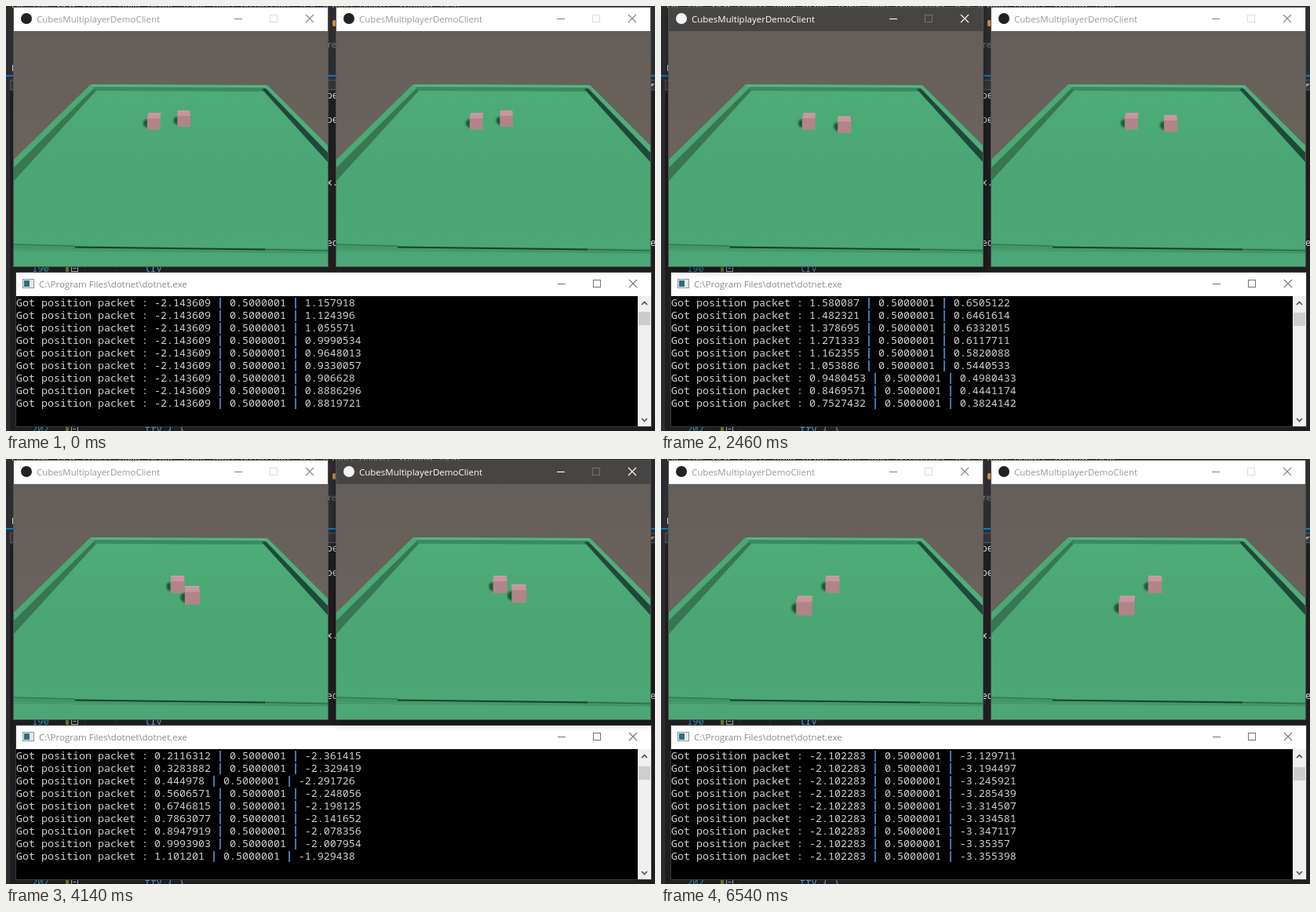
Write an HTML page that moves like this. It is 827 by 542 pixels and loops after 6660 ms.

```html
<!DOCTYPE html>
<html lang="en">
<head>
<meta charset="utf-8">
<title>Cubes multiplayer demo</title>
<style>
html, body { margin: 0; width: 100%; height: 100%; overflow: hidden; background: #1e1e1e; }
svg { display: block; }
text { white-space: pre; }
.ui { font-family: "Open Sans", "Noto Sans", sans-serif; font-size: 11.5px; }
.mono { font-family: "Noto Sans Mono", "DejaVu Sans Mono", monospace; font-size: 13.333px; }
.code { font-family: "Noto Sans Mono", "DejaVu Sans Mono", monospace; font-size: 12px; }
.pipe { fill: #5aa0e0; font-weight: bold; }
</style>
</head>
<body>
<svg id="stage" width="827" height="542" viewBox="0 0 827 542"></svg>
<script>
const LOOP = 6660, STEP = 60, PACKET = 20, ROWS = 9;
const LEFT_ON = 480, SWITCH = 2760, ALL_OFF = 6540;

// ---- motion: a few key points [time, x, z] per cube
const HOME = -2.143609, SIDE = -2.102283;
const cubeB = [
  [700, .28, 1.31], [930, .281, .7],
  [1160, .2971759, -.3498101], [1240, .4192981, -.7630728], [1320, .6473886, -1.177583],
  [1590, 1.83, -1.75], [1930, 2.8, -.5], [2110, 2.4, .22],
  [2300, 1.580087, .6505122], [2460, .7527432, .3824142], [2700, -.2213, -.6604]
];
const cubeA = [
  [-160, HOME, 1.157918], [-100, HOME, .9990534], [0, HOME, .8819721],
  [2860, HOME, .8819721], [3130, HOME, .15],
  [3380, -2.117997, -.9949791], [3460, -2.025084, -1.32549], [3540, -1.815446, -1.658332],
  [3850, -.5, -2.45], [4130, 1.05, -1.97], [4390, 2.2, -.35],
  [4640, 1.187943, 1.33658], [4800, .4374101, 1.866238], [4970, -.4, 2.02],
  [5250, -1.62, 1.4], [5490, SIDE, .25],
  [5600, SIDE, -.2301522], [5760, SIDE, -.9809671], [6260, SIDE, -3.129711], [6420, SIDE, -3.355398]
];

// Tangent at a key; flat at the ends and at turning points
function slope(keys, i, d) {
  const a = keys[i - 1], k = keys[i], b = keys[i + 1];
  if (!a || !b || (b[d] - k[d]) * (k[d] - a[d]) <= 0) return 0;
  return (b[d] - a[d]) / (b[0] - a[0]);
}

function at(keys, t) {
  const last = keys.length - 1;
  if (t <= keys[0][0]) return keys[0].slice(1);
  if (t >= keys[last][0]) return keys[last].slice(1);
  let i = 0;
  while (keys[i + 1][0] <= t) i++;
  const p = keys[i], q = keys[i + 1], h = q[0] - p[0], u = (t - p[0]) / h;
  const w = u * u * (3 - 2 * u);
  return [1, 2].map(d => p[d] + (q[d] - p[d]) * w
    + h * slope(keys, i, d) * u * (1 - u) * (1 - u)
    - h * slope(keys, i + 1, d) * u * u * (1 - u));
}

// ---- packet log, one line per tick while a cube moves
const num = v => String(Number(v.toPrecision(7)));
const log = [];
function record(keys, from, to) {
  for (let t = from; t <= to; t += PACKET) {
    const [x, z] = at(keys, t);
    log.push({ t, x, z });
  }
}
record(cubeA, -160, 0);
record(cubeB, 720, 2700);
record(cubeA, 2880, 6420);

// ---- drawing helpers
const poly = (pts, fill, more = "") => `<polygon points="${pts}" fill="${fill}" ${more}/>`;
const rect = (x, y, w, h, fill, more = "") =>
  `<rect x="${x}" y="${y}" width="${w}" height="${h}" fill="${fill}" ${more}/>`;
const line = (d, stroke, width = 1, more = "") =>
  `<path d="${d}" fill="none" stroke="${stroke}" stroke-width="${width}" ${more}/>`;
const text = (x, y, s, fill, cls, more = "") =>
  `<text x="${x}" y="${y}" fill="${fill}" class="${cls}" ${more}>${s}</text>`;

function codeLine(n, y, s) {
  return text(33, y, n, "#2b91af", "code") + text(177, y, s, "#569cd6", "code")
    + rect(76, y - 10, 4, 17, "#577430")
    + rect(83.5, y - 8, 8, 8, "#1e1e1e", 'stroke="#a5a5a5"')
    + line(`M85.5 ${y - 4}h4`, "#a5a5a5");
}

function editor() {
  const menu = "File   Edit   View   Project   Build   Debug   Team   Tools   Architecture   "
    + "Test   R Tools   Analyze   Window   Help";
  const gap = [[118, "pe"], [149, "pe"], [229, "x."], [306, "ed"]];
  return rect(0, 0, 827, 542, "#1e1e1e") + rect(0, 0, 827, 109, "#2d2d30")
    + text(7, 2, menu, "#d8d8d8", "ui")
    + text(7, 83, "N", "#f1f1f1", "ui") + text(410, 53, "re", "#777", "ui")
    + rect(416, 18, 5, 8, "#d08a4a", 'rx="2"')
    + rect(0, 88, 827, 2, "#007acc")
    + rect(5.5, 94.5, 830, 12, "#333337", 'stroke="#55555a"')
    + poly("819,99 827,99 823,103", "#999")
    + rect(0, 109, 5, 433, "#2d2d30")
    + gap.map(([y, s]) => text(408.5, y, s, "#dcdcdc", "code")).join("")
    + text(821, 306, "e", "#dcdcdc", "code")
    + codeLine(190, 338.5, "try") + codeLine(202, 543.5, "try { }")
    + line("M100.5 333v7M139.5 333v7M100.5 536v6M139.5 536v6", "#444", 1, 'stroke-dasharray="1 3"');
}

function buttons(x, y) {
  return `<g fill="none" stroke="#777" stroke-width="1.1">
    <path d="M${x} ${y + .5}h10"/>
    <rect class="max" x="${x + 45.5}" y="${y - 4.5}" width="9" height="9"/>
    <path d="M${x + 91} ${y - 5}l10 10m0 -10l-10 10"/></g>`;
}

function scene() {
  return rect(10, 32, 400, 300, "url(#sky)")
    + poly("108,100 333,101 410,178 410,332 10,332 10,196", "url(#floor)")
    + poly("108,100 115,104 10,207 10,196", "#4ba877")
    + poly("113,104 115,108 10,223 10,206", "#397653")
    + poly("108,100 333,101 330,104 112,103", "#55b683")
    + poly("112,103 330,104 328,109 114,108", "#3b8a62")
    + poly("333,101 410,178 410,188 329,104", "#4fae7c")
    + poly("326,106 331,105 410,187 410,199", "#20483a")
    + poly("10,304 88,306 410,310 410,315 10,310", "#429669")
    + line("M10 304L88 306", "#347a56", 1.5)
    + line("M88 307.5L330 310.5", "#1b3b2e", 1.8)
    + line("M330 310.5L410 312", "#2a5f47", 1.2)
    + line("M10 311.5L410 315", "#3f9167");
}

function gameWindow(i) {
  return `<g transform="translate(${i * 411} 0)">
    <g id="glow${i}">${rect(8, 4, 404, 334, "#000", 'opacity=".3" filter="url(#soft)"')}</g>
    ${rect(9, 1, 402, 332, "#55514f")}
    ${rect(10, 2, 400, 30, "#fff", `id="bar${i}"`)}
    <circle id="icon${i}" cx="26" cy="16" r="7"/>
    ${text(39, 21, "CubesMultiplayerDemoClient", "#999", "ui", `id="name${i}"`)}
    <g id="btn${i}">${buttons(291, 16)}</g>
    ${scene()}
    <g id="cubes${i}"></g></g>`;
}

function consoleWindow() {
  let rows = "";
  for (let r = 0; r < ROWS; r++) rows += text(13, 383 + 16 * r, "", "#d2d2d2", "mono", `id="row${r}"`);
  return rect(12, 339, 811, 198, "#3a3a3c") + rect(13, 340, 809, 30, "#fff")
    + rect(21.5, 348.5, 14, 11, "#e8e8e8", 'stroke="#8d979c"') + rect(23, 350, 7, 8, "#2f6f80")
    + text(42, 359, "C:\\Program Files\\dotnet\\dotnet.exe", "#8a8a8a", "ui")
    + buttons(703, 354)
    + rect(13, 370, 792, 166, "#000") + rows
    + rect(805, 370, 17, 166, "#f0f0f0")
    + line("M810 381l3.5 -3.5l3.5 3.5M810 526l3.5 3.5l3.5 -3.5", "#505050", 1.6)
    + rect(806, 390, 15, 17, "#cdcdcd", 'id="thumb"');
}

document.getElementById("stage").innerHTML = `<defs>
  <linearGradient id="sky" x1="0" y1="0" x2="0" y2="1">
    <stop offset="0" stop-color="#645e5a"/><stop offset=".4" stop-color="#6a625c"/></linearGradient>
  <linearGradient id="floor" x1="0" y1="0" x2="0" y2="1">
    <stop offset="0" stop-color="#4dac79"/><stop offset=".5" stop-color="#4aa674"/>
    <stop offset="1" stop-color="#4ba876"/></linearGradient>
  <filter id="soft" x="-10%" y="-10%" width="120%" height="120%"><feGaussianBlur stdDeviation="5"/></filter>
  <filter id="blur" x="-40%" y="-40%" width="180%" height="180%"><feGaussianBlur stdDeviation="1"/></filter>
  </defs>` + editor() + consoleWindow() + gameWindow(0) + gameWindow(1);

const el = id => document.getElementById(id);

// ---- perspective view of one cube standing at (x, z)
function cube([x, z]) {
  const s = 1 / (.0608 + .00243 * z);
  const cx = 222.3 + x * s, cy = 147.5 + 12.9 * (s - 15.9);
  const pts = list => list.map(([a, b]) => `${(cx + a * s).toFixed(2)},${(cy + b * s).toFixed(2)}`).join(" ");
  const lean = -x * .03;
  return poly(pts([[-.45, -.2], [-.75, -.12], [-.85, .1], [-.78, .35], [-.45, .55]]), "#123c2b",
      'opacity=".8" filter="url(#blur)"')
    + poly(pts([[-.53, -.28], [.53, -.28], [.53, .64], [-.53, .64]]), "#b28489")
    + poly(pts([[-.5 + lean, -.67], [.5 + lean, -.67], [.53, -.26], [-.53, -.26]]), "#c895a0")
    + line(`M${pts([[-.5 + lean, -.65]])}L${pts([[.5 + lean, -.65]])}`, "#d3a9ab", .8);
}

function setActive(i, on) {
  el("glow" + i).style.display = on ? "" : "none";
  el("bar" + i).setAttribute("fill", on ? "#474544" : "#fff");
  el("icon" + i).setAttribute("fill", on ? "#f4f4f4" : "#222");
  el("name" + i).setAttribute("fill", on ? "#fff" : "#999");
  const g = el("btn" + i).firstElementChild;
  g.setAttribute("stroke", on ? "#fff" : "#888");
  g.querySelector(".max").setAttribute("stroke", on ? "#747270" : "#ddd");
}

function draw(t) {
  const driver = t < SWITCH ? 0 : 1;
  const live = t >= LEFT_ON && t < ALL_OFF;
  for (let i = 0; i < 2; i++) {
    setActive(i, live && i === driver);
    // the other client trails behind the network
    const seen = Math.max(0, t + (i === driver ? 10 : -50));
    el("cubes" + i).innerHTML = [at(cubeA, seen), at(cubeB, seen)]
      .sort((p, q) => q[1] - p[1]).map(cube).join("");
  }
  const pipe = ' <tspan class="pipe">|</tspan> ';
  const seenLog = log.filter(p => p.t <= t);
  seenLog.slice(-ROWS).forEach((p, r) => {
    el("row" + r).innerHTML = "Got position packet : " + [num(p.x), "0.5000001", num(p.z)].join(pipe);
  });
  el("thumb").setAttribute("y", 390 + Math.floor(seenLog.length / 80));
}

let start = null, shown = -1;
function tick(now) {
  if (start === null) start = now;
  const t = Math.floor(((now - start) % LOOP) / STEP) * STEP;
  if (t !== shown) draw(shown = t);
  requestAnimationFrame(tick);
}
draw(0);
requestAnimationFrame(tick);
</script>
</body>
</html>
```
